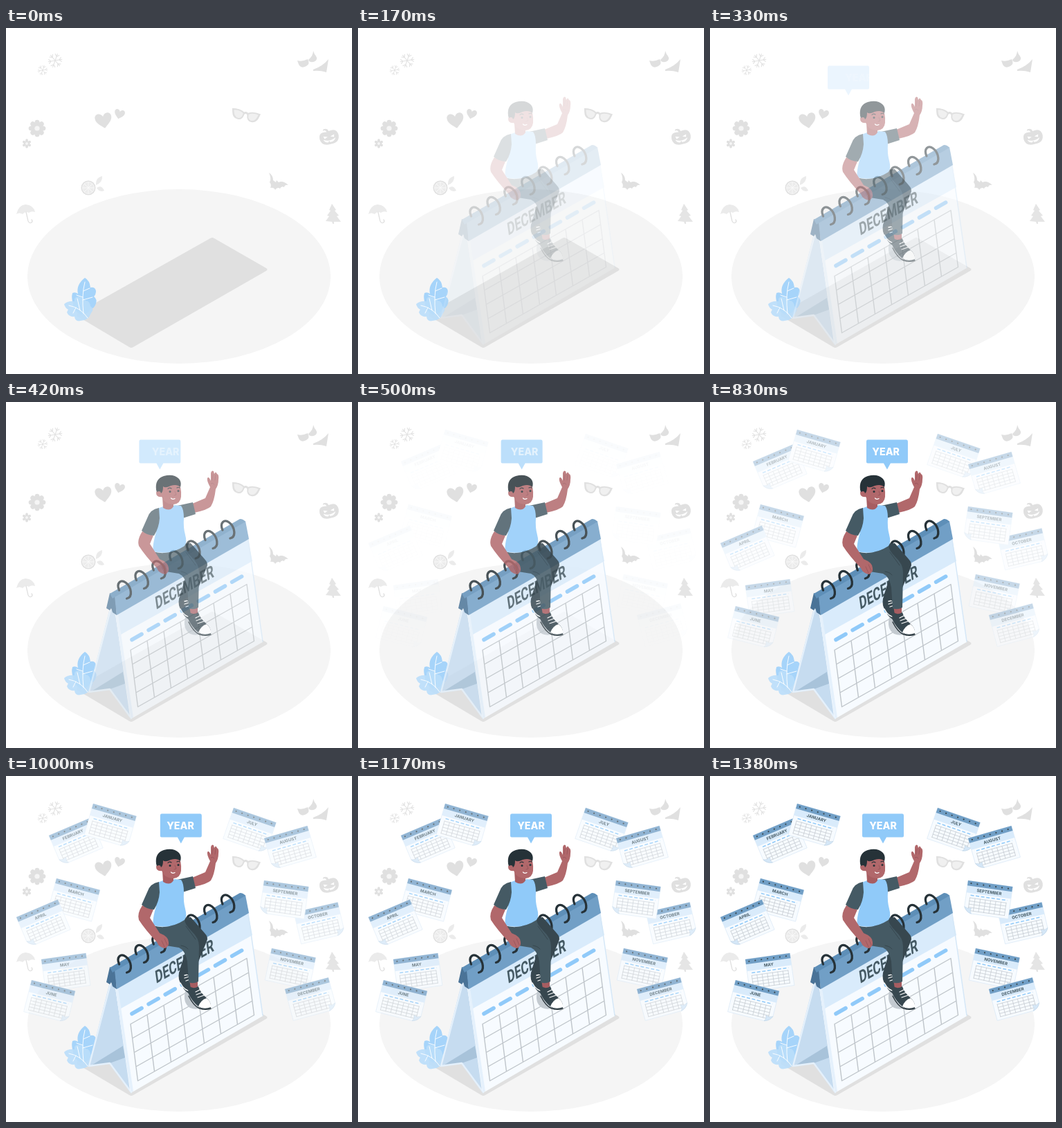
An HTML page for the animation above (1.43 s loop, 500x500 px).

```html
<!DOCTYPE html>
<html>
<head>
<meta charset="utf-8">
<style>
  html, body { margin: 0; height: 100%; overflow: hidden; background: #fff; }
  svg { display: block; width: 100vw; height: 100vh; }
  text { font-family: Inter, Roboto, sans-serif; font-weight: 700; }
  .line { fill: none; stroke-linecap: round; stroke-linejoin: round; }
</style>
</head>
<body>
<svg viewBox="0 0 500 500">
  <ellipse cx="250" cy="359" rx="219" ry="126" fill="#f5f5f5"/>
  <path d="M104 417Q100 414 105 411L295 304Q298 302 301 304L376 347Q379 349 376 351L184 461Q181 463 178 461Z" fill="#e0e0e0"/>

  <g id="icons" fill="#e0e0e0">
    <g id="flakes" class="line" stroke="#e2e2e2"></g>
    <g id="flowers"></g>
    <g id="hearts"></g>
    <path d="M421 47Q428 49 436 45Q440 52 434 55Q425 60 422 50ZM437 46Q444 40 444 33L446 38Q451 43 448 47Q443 51 438 48ZM444 60Q458 55 466 45L463 64Q454 61 444 62Z"/>
    <g transform="translate(346 127) rotate(12)">
      <path d="M-21-7Q-10-9-3-5Q0-7 3-5Q10-9 21-7L20-3Q18 7 10 7Q3 7 2-2Q0-4-2-2Q-3 7-10 7Q-18 7-20-3Z"/>
      <path d="M-18-5Q-10-7-4-3Q-4 5-10 5Q-16 5-18-5ZM18-5Q10-7 4-3Q4 5 10 5Q16 5 18-5Z" fill="#f0f0f0"/>
    </g>
    <g transform="translate(467 158) rotate(-12)">
      <path d="M-2-8Q-3-12-7-11L-6-13Q0-14 1-9Q14-12 14 0Q13 11 0 10Q-13 11-14 0Q-14-11-2-8Z"/>
      <path d="M-8-3L-2-1L-7 1ZM8-3L2-1L7 1ZM-9 2Q0 7 9 2Q6 8 0 7L-1 5L-3 7Q-8 6-9 2Z" fill="#fff"/>
    </g>
    <g id="fruit">
      <path d="M130 225Q130 216 139 214Q140 223 130 227ZM131 231Q138 226 142 235Q135 238 131 231Z" fill="#ebebeb"/>
      <circle cx="119" cy="231" r="10.5"/>
      <circle cx="119" cy="231" r="8.5" fill="#ececec" stroke="#fafafa" stroke-width=".8"/>
    </g>
    <path d="M380 209Q386 213 386 220L390 223L391 220L394 223Q400 220 408 227Q403 226 402 230Q398 228 396 232Q392 229 389 234Q387 230 382 231Q384 226 381 223Q384 218 380 209Z"/>
    <path d="M15 269Q18 256 28 255Q40 256 42 266Q37 264 33 267Q28 264 24 269Q19 266 15 269Z" fill="#ebebeb"/>
    <path d="M29 266L32 279Q34 283 37 281Q39 279 37 277" class="line" stroke="#e0e0e0" stroke-width="1.3"/>
    <path d="M471 254L477 263L475 264L481 271L478 272L484 280L474 280L474 283L472 283L471 280L462 279L467 272L464 271L469 264L467 263Z" fill="#e5e5e5"/>
  </g>

  <g>
    <path d="M114 361Q121 365 122 375Q129 374 130 380Q130 385 127 388Q132 392 130 398Q128 405 122 406Q118 414 108 414Q96 408 97 398Q94 390 96 383Q100 381 104 384Q101 371 114 361Z" fill="#a6d4fa"/>
    <path d="M84 399Q90 394 99 395Q98 389 104 388Q112 389 115 394Q121 394 122 402Q128 406 123 412Q119 423 108 423Q100 425 99 417Q91 418 88 411Q89 408 90 407Q85 404 84 399Z" fill="#bbdefb" fill-opacity=".9"/>
    <path d="M114 367Q109 386 112 413M112 380L121 376M111 393L125 389M111 389L102 386M91 401Q108 404 118 419M101 404L97 412M107 408L103 391" class="line" stroke="#fff" stroke-width=".9"/>
  </g>

  <g id="months"></g>

  <g id="calendar">
    <path d="M150 298L158 307L181 457L150 415L119 420Z" fill="#c6dcf0"/>
    <path d="M122 419L169 390L172 407L150 415Z" fill="#a8c3da"/>
    <path d="M151 300L120 419L150 415L181 457" class="line" stroke="#e4f0fb" stroke-width="2.4"/>
    <path d="M158 305L350 198L371 344Q372 347 369 348L184 456Q180 458 179 454Z" fill="#f7fbff"/>
    <path d="M159 306L350 198L356 230L166 336Z" fill="#d9ebfb"/>
    <path d="M158 306L180 456L184 456L162 307Z" fill="#e5f1fc"/>
    <path d="M350 199L371 346" class="line" stroke="#d5e7f7" stroke-width="1.5"/>
    <path d="M150 276L158 281L160 308L154 304L152 298L150 301L145 298Z" fill="#4a7397"/>
    <path d="M157 281L346 172L351 198L160 308Z" fill="#719fc6"/>
    <path d="M150 277L338 169Q343 169 346 173L157 282L154 284Z" fill="#5e8fb8"/>
    <text transform="matrix(.655 -.37 .14 .99 217 300)" font-size="25" style="font-family:Roboto,sans-serif" fill="#455a64">DECEMBER</text>
    <g id="page" class="line"></g>
  </g>

  <g id="man">
    <path d="M259 311Q255 328 266 335Q273 338 279 336L272 315Z" fill="#c3cad0"/>
    <path d="M252 279L262 284L268 304Q270 312 265 314Q258 312 254 302Q248 295 250 284Z" fill="#37474f"/>
    <path d="M252 299Q258 311 268 311M258 288L263 287M258 292L264 290M260 296L266 294" class="line" stroke="#fff" stroke-width="1.3"/>
    <path d="M254 205L267 204L287 227Q293 233 290 239L277 271L264 288L251 280L264 240L243 222Z" fill="#37474f"/>
    <path d="M265 294L277 294L277 308L267 308Z" fill="#a75d61"/>
    <path d="M212 216Q235 223 258 207Q258 214 268 224Q279 234 279 246L278 297Q271 301 264 298L262 268Q259 252 250 248L231 245Q214 238 212 216Z" fill="#455a64"/>
    <path d="M260 217Q269 229 274 236M263 250Q260 246 253 245" class="line" stroke="#37474f"/>
    <path d="M264 303Q270 309 278 304Q280 312 289 320Q297 326 296 335Q287 340 279 334Q268 325 263 313Z" fill="#37474f"/>
    <path d="M278 333Q282 323 290 321Q297 327 296 334Q286 338 278 333Z" fill="#fff"/>
    <path d="M274 312L280 309M275 316L283 313M277 320L286 317" class="line" stroke="#fff" stroke-width="1.2"/>
    <path d="M264 318Q271 332 279 335.500Q288 339 296 336" class="line" stroke="#263238" stroke-width="1.4"/>

    <path d="M269 147L288 139L295 123Q290 114 291 110Q293 107 296 114L296 103Q297 98 300 100L301 104Q303 99 305 104Q308 105 307 112Q307 120 303 126Q301 143 296 151Q291 156 272 160Z" fill="#b1686b"/>
    <path d="M298 113L299 105M302 113L303 105M296 118Q299 116 301 119" class="line" stroke="#96545a" stroke-width=".8"/>
    <path d="M247 150L270 145L274 162L255 168Z" fill="#455a64"/>
    <path d="M219 154L227 151Q237 157 243 149L253 150Q257 155 257 168Q256 181 259 192Q262 203 258 208Q237 222 213 216Q211 208 217 188Z" fill="#90caf9"/>
    <path d="M226 137L227 153Q237 159 242 151L242 142Z" fill="#a75d61"/>
    <path d="M197 187Q189 199 192 208Q201 222 218 240Q221 248 230 249Q236 246 235 240Q235 232 222 227L208 205L213 193Z" fill="#b1686b"/>
    <path d="M225 238L229 247M229 235L233 244" class="line" stroke="#96545a" stroke-width=".8"/>
    <path d="M221 153Q208 155 204 168L196 186Q204 193 214 193Q221 182 222 168Z" fill="#455a64"/>
    <path d="M221 121L248 115Q254 122 253 137Q252 147 242 148Q229 148 225 137Q217 138 217 131Q218 126 223 129Z" fill="#b1686b"/>
    <path d="M217 127Q215 111 228 107Q242 103 250 111Q254 116 252 123Q247 118 238 121Q230 125 227 122Q227 130 224 132Q223 127 218 130Z" fill="#263238"/>
    <path d="M234 125.500Q236 123 239 125M247 124Q249 122.500 251 124" class="line" stroke="#263238" stroke-width="1.2"/>
    <path d="M244 129L246 134L243 135" class="line" stroke="#96545a" stroke-width=".9"/>
    <path d="M238.500 139Q241 141.500 244 139.500" class="line" stroke="#fff" stroke-width="1.2"/>
    <circle cx="237" cy="129.500" r="1.5" fill="#263238"/><circle cx="249" cy="128.500" r="1.5" fill="#263238"/>
  </g>

  <path id="bubble" d="M222 54.500H278Q280 54.500 280 57V86.500Q280 88.500 278 88.500H255L250 97.500L245 88.500H222Q220 88.500 220 86.500V57Q220 54.500 222 54.500Z" fill="#90caf9"/>
  <text id="label" x="250" y="77" text-anchor="middle" font-size="14.200" style="font-weight:800" fill="#fff">YEAR</text>
</svg>
<script>
const LOOP = 1430;
const $ = id => document.getElementById(id);
const range = n => [...Array(n).keys()];
const add = (id, markup) => $(id).insertAdjacentHTML('beforeend', markup);

// Background icons
for (const [x, y, r] of [[71, 47, 10], [53, 61, 7]])
  add('flakes', range(6).map(i => `<path transform="translate(${x} ${y}) rotate(${i * 60 + 20}) scale(${r / 10})"
    d="M0 0V-10M0-6L-3-9M0-6L3-9" stroke-width="1.1"/>`).join(''));

for (const [x, y, r, n] of [[45, 145, 12, 8], [30, 167, 6.5, 6]])
  add('flowers', `<g transform="translate(${x} ${y})">${range(n).map(i =>
    `<ellipse cy="${-r * .66}" rx="${r * .3}" ry="${r * .37}" transform="rotate(${i * 360 / n})"/>`).join('')}
    <circle r="${r * .55}"/><circle r="${r * .3}" fill="#f5f5f5"/></g>`);

for (const [x, y, s, a] of [[141, 133, 1, -10], [164, 124, .62, 14]])
  add('hearts', `<path transform="translate(${x} ${y}) rotate(${a}) scale(${s})"
    d="M0 12C-5 7-12 3-12-4C-12-11-3-12 0-5C3-12 12-11 12-4C12 3 5 7 0 12Z"/>`);

add('fruit', range(8).map(i => `<path d="M119 231v-8" transform="rotate(${i * 45} 119 231)"
  stroke="#fafafa" stroke-width=".9"/>`).join(''));

// Large calendar: sheared grid, weekday dashes and binding rings
const gridPoint = (u, v) => `${180 + 168 * u + 10.5 * v} ${358.5 - 95 * u + 82 * v}`;
const rows = range(5).map(i => `M${gridPoint(0, i / 4)}L${gridPoint(1, i / 4)}`);
const columns = range(8).map(i => `M${gridPoint(i / 7, 0)}L${gridPoint(i / 7, 1)}`);
add('page', `<path d="${rows.concat(columns).join('')}" stroke="#bfc5ca" stroke-width="1.4"/>`);
for (const i of range(7)) {
  add('page', `<path transform="translate(${24.1 * i} ${-13.9 * i})" d="M182 343.5L196 335.5" stroke="#90caf9" stroke-width="5.6"/>
    <path transform="translate(${24.9 * i} ${-14.5 * i})" d="M163.500 272C159 261 166 256 173 261C181 267 184 282 174.500 284" stroke="#263238" stroke-width="3.3"/>`);
}

// Month sheets: name, top-left corner, angle, curled corner (1 right, 0 left)
const sheets = [
  ['FEBRUARY', 62, 86, -23, 0], ['JANUARY', 126, 40, 16, 1],
  ['MARCH', 73, 148, 15, 0], ['APRIL', 15, 204, -23, 0],
  ['MAY', 51, 265, -8, 0], ['JUNE', 37, 295, 14, 1],
  ['JULY', 329, 46, 19, 1], ['AUGUST', 373, 90, -16, 0],
  ['OCTOBER', 416, 197, -13, 1], ['SEPTEMBER', 373, 151, 8, 0],
  ['NOVEMBER', 384, 249, 12, 1], ['DECEMBER', 403, 308, -15, 1]
];
const smallGrid = range(5).map(i => `M6 ${24.4 + i * 4.6}h53`).join('') +
  range(8).map(i => `M${6 + i * 53 / 7} 24.4v18.4`).join('');
for (const [name, x, y, angle, right] of sheets) {
  const flip = right ? '' : 'transform="matrix(-1 0 0 1 65 0)"';
  add('months', `<g transform="translate(${x} ${y}) rotate(${angle})">
    <path ${flip} d="M0 0H65V38Q62 45 55 47H0Z" fill="#f7fbff" stroke="#dbe9f6" stroke-width=".7"/>
    <path d="M0 7H65V17.500H0Z" fill="#d9ebfb"/>
    <path d="M0 0H65V7.300H0Z" fill="#719fc6"/>
    <path d="M5 3.500H62" class="line" stroke="#37474f" stroke-width="2.2" stroke-dasharray="0 9"/>
    <text x="32.500" y="14.500" font-size="6" text-anchor="middle" fill="#455a64">${name}</text>
    <path d="M6.500 20.600H60" stroke="#90caf9" stroke-width="1.5" stroke-dasharray="5 2.6"/>
    <path d="${smallGrid}" class="line" stroke="#c3c9ce" stroke-width=".7"/>
    <path ${flip} d="M65 38Q60 41 55 39Q57 44 54 47Q62 45 65 38Z" fill="#d5e7f7" stroke="#b9cfe2" stroke-width=".5"/>
  </g>`);
}

const progress = (t, start, length) => Math.min(1, Math.max(0, (t - start) / length));
const backOut = p => 1 + 2.70158 * (p - 1) ** 3 + 1.70158 * (p - 1) ** 2;

function draw(now) {
  const t = now % LOOP;
  $('calendar').style.opacity = $('man').style.opacity = progress(t, 76, 504);
  $('months').style.opacity = progress(t, 460, 920);

  const offset = backOut(progress(t, 298, 880)) - 1;
  const slide = (id, width) => {
    $(id).setAttribute('transform', `translate(${offset * width} 0)`);
    $(id).style.opacity = progress(t, 257, 405);
  };
  slide('bubble', 60);
  slide('label', 42);
  requestAnimationFrame(draw);
}
draw(performance.now());
</script>
</body>
</html>
```
